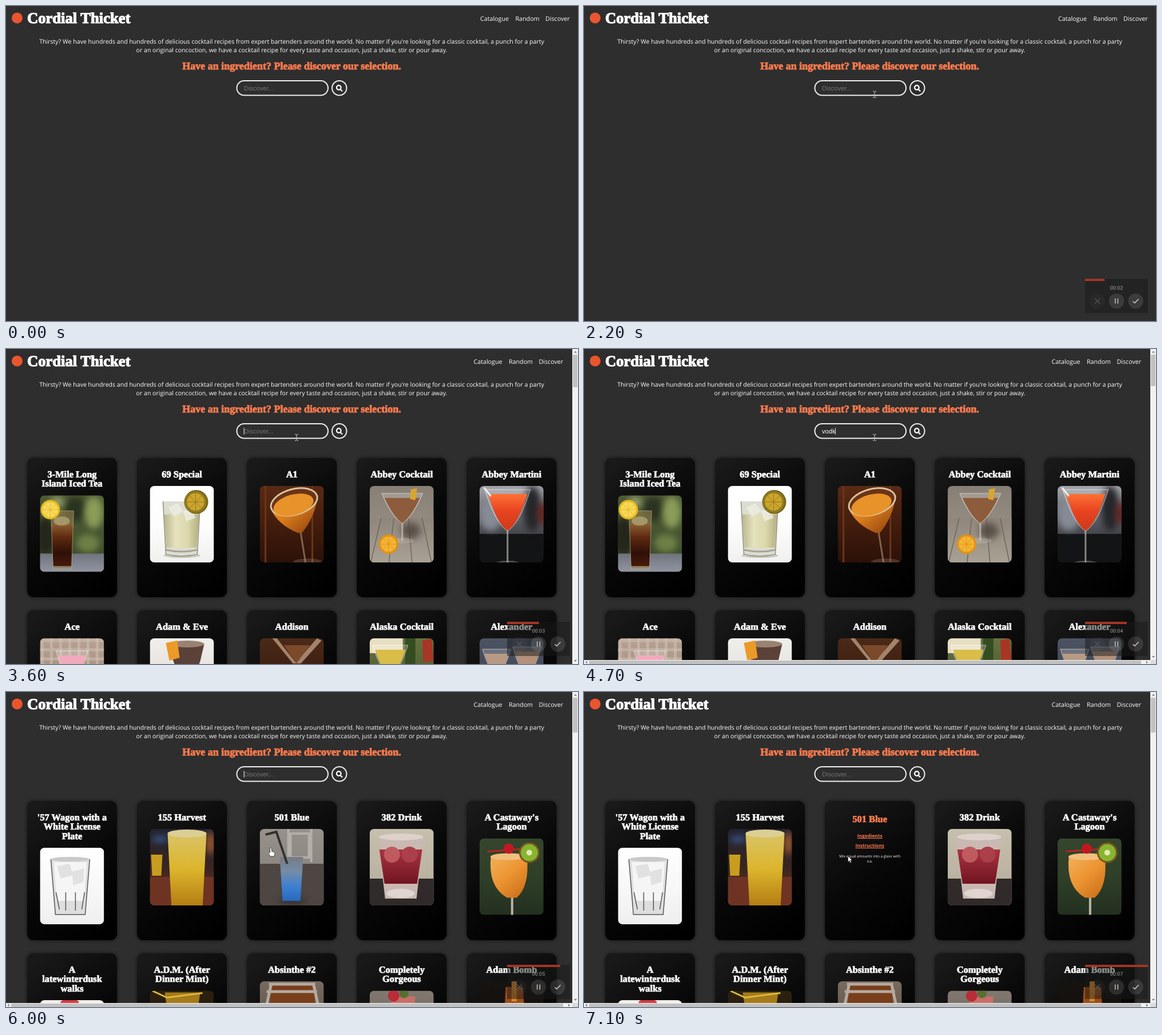
Recreate the animation shown at these times as an HTML page with a canvas. Size 1000x552 px, loop 7.2 s.

```html
<!DOCTYPE html>
<html lang="en">
<head>
<meta charset="utf-8">
<title>Cordial Thicket</title>
<style>
  html, body { margin: 0; height: 100%; overflow: hidden; background: #2e2e2e; }
  canvas { display: block; }
</style>
</head>
<body>
<canvas id="stage" width="1000" height="552"></canvas>
<script>
const ctx = document.getElementById('stage').getContext('2d');
const LOOP = 7200, STEP = 100;
const BG = '#2e2e2e', CORAL = '#ff7b4d', TAU = Math.PI * 2;
const SANS = '"Open Sans", sans-serif', ARIAL = '"Liberation Sans", sans-serif';
const CARDS_AT = 2600, RESULTS_AT = 5200, FLIP_AT = 6400, FLIP_MS = 500;
const KEYS = [4200, 4350, 4500, 4650, 4800];

// ---- drawing helpers ----
function fill(color, path) {
  ctx.fillStyle = color;
  ctx.fill(new Path2D(path));
}
function line(color, width, path) {
  ctx.strokeStyle = color;
  ctx.lineWidth = width;
  ctx.stroke(new Path2D(path));
}
function disc(color, x, y, rx, ry = rx, tilt = 0) {
  ctx.fillStyle = color;
  ctx.beginPath();
  ctx.ellipse(x, y, rx, ry, tilt, 0, TAU);
  ctx.fill();
}
function rect(color, x, y, w, h) {
  ctx.fillStyle = color;
  ctx.fillRect(x, y, w, h);
}
function rounded(x, y, w, h, r) {
  ctx.beginPath();
  ctx.roundRect(x, y, w, h, r);
}
function gradient(x0, y0, x1, y1, ...colors) {
  const g = ctx.createLinearGradient(x0, y0, x1, y1);
  colors.forEach((c, i) => g.addColorStop(i / (colors.length - 1), c));
  return g;
}
function write(text, x, y, font, color, align = 'center') {
  ctx.font = font;
  ctx.textAlign = align;
  ctx.fillStyle = color;
  ctx.fillText(text, x, y);
}
function display(text, x, y, size, color = '#fff', align) {
  write(text, x, y, `bold ${size}px "Liberation Serif", serif`, color, align);
  ctx.strokeStyle = color;
  ctx.lineWidth = size / 22;
  ctx.strokeText(text, x, y);
}

// ---- photographs, each 112 x 134 ----
const backdrop = (...colors) => rect(gradient(0, 0, 0, 134, ...colors), 0, 0, 112, 134);
const tumbler = (color, left, right, top, bottom, inset) =>
  fill(color, `M${left} ${top}H${right}L${right - inset} ${bottom}H${left + inset}Z`);
function haze(color, x, y, rx, ry) {
  ctx.filter = 'blur(6px)';
  disc(color, x, y, rx, ry);
  ctx.filter = 'none';
}
function martini(drink, x, rim, half, apex, foot) {
  const bowl = (w, top) =>
    `M${x - w} ${top}H${x + w}Q${x + w * .55} ${apex - 14} ${x} ${apex}Q${x - w * .55} ${apex - 14} ${x - w} ${top}Z`;
  line('#d5d0c999', 3, `M${x} ${apex - 4}V${foot}`);
  disc('#c9c4bd55', x, foot, half * .55, 5);
  fill('#ffffff33', bowl(half, rim));
  fill(drink, bowl(half * .86, rim + 8));
  line('#ffffff88', 1, bowl(half, rim));
}
function citrus(x, y, r, rind, flesh) {
  disc(rind, x, y, r);
  disc(flesh, x, y, r * .8);
  for (let a = 0; a < 4; a++) {
    const dx = r * .8 * Math.cos(a * TAU / 8), dy = r * .8 * Math.sin(a * TAU / 8);
    line(rind, 1, `M${x - dx} ${y - dy}L${x + dx} ${y + dy}`);
  }
}

function icedTea() {
  backdrop('#4c5a33', '#465431', '#3a4529');
  haze('#23261a', 10, 72, 18, 34);
  haze('#2a3320', 62, 24, 18, 22);
  haze('#8a9c58', 94, 30, 16, 28);
  haze('#6d8146', 84, 84, 20, 16);
  haze('#93a06e', 30, 12, 12, 10);
  rect(gradient(0, 102, 0, 134, '#6f737d', '#9095a1'), 0, 102, 112, 32);
  tumbler('#97804f99', 19, 59, 27, 129, 4);
  tumbler(gradient(0, 46, 0, 128, '#93693a', '#5e2a10', '#2f1008', '#4b1c0b'), 20, 58, 50, 124, 3);
  disc('#cdbb8f88', 38, 45, 14, 8);
  line('#d8cfb477', 1, 'M19 27L23 129H55L59 27Z');
  citrus(18, 25, 17, '#e9b81e', '#f6d95c');
}
function special() {
  backdrop('#fff', '#fdfdfc', '#f0f0ed');
  disc('#c4c4bc', 56, 122, 32, 4);
  tumbler('#dcdcd2', 23, 88, 27, 123, 5);
  tumbler(gradient(24, 0, 87, 0, '#b9b58b', '#e4e1bd', '#dcd8ac', '#b3ad7e'), 25, 86, 50, 108, 4);
  line('#8f8f80', 1.5, 'M23 27L28 120Q56 126 83 120L88 27');
  line('#a5a592', 3, 'M28 112Q56 118 83 112');
  fill('#f1f1e4bb', 'M32 38L48 30L58 44L42 54ZM58 44L74 38L80 56L64 62Z');
  disc('#75681c', 81, 28, 21);
  citrus(80, 28, 19, '#8f7b20', '#cda42c');
}
function a1() {
  backdrop('#5a2a14', '#431d0d', '#2b1108');
  line('#6b3519', 3, 'M10 0V134M92 0V134');
  line('#b8937a99', 3, 'M71 78L80 134');
  disc('#b8937a44', 84, 134, 26, 7);
  fill(gradient(20, 10, 80, 84, '#efa233', '#dd7f1c', '#9a4a12'), 'M19 40Q32 68 66 82L73 83Q96 56 102 16Z');
  disc('#d9c4a0', 60, 28, 43, 24, -.26);
  disc('#6b3416', 60, 28, 40, 21, -.26);
  disc('#e8922a', 59, 33, 36, 18, -.26);
}
function abbey() {
  backdrop('#877f75', '#958c81', '#8d8478');
  rect(gradient(0, 56, 0, 134, '#8f867b', '#aaa195'), 0, 57, 112, 77);
  line('#6f665c', 1.5, 'M20 57L2 134M42 57L34 134M68 57L74 134M92 57L108 134');
  haze('#4b443dcc', 72, 79, 17, 15);
  martini('#8a5330dd', 57, 13, 36, 66, 96);
  fill('#d9a52f', 'M72 6L83 4L80 25L71 23Z');
  citrus(33, 102, 17, '#e09214', '#f4b436');
}
function abbeyMartini() {
  backdrop('#a3a5aa', '#54555b', '#18181a');
  rect('#131416', 0, 84, 112, 50);
  haze('#858a94', 20, 50, 20, 28);
  haze('#26272b', 92, 40, 16, 40);
  haze('#672018', 110, 48, 8, 20);
  martini(gradient(0, 12, 0, 75, '#ff7436', '#e84420', '#d23a1a'), 49, 6, 40, 79, 136);
  line('#eee', 3, 'M8 3L20 18');
}
function ace() {
  backdrop('#b5a193', '#9a8073');
  for (let x = 4; x < 112; x += 16) line('#d2c4b488', 5, `M${x} 0V134M0 ${x}H112`);
  martini('#f3a9bc', 56, 22, 28, 80, 128);
}
function adam() {
  backdrop('#f1efec', '#d5d1cd');
  fill('#5b4137', 'M34 10H95L88 40Q78 70 62 68Q42 60 34 10Z');
  disc('#9a8271', 65, 10, 30, 6);
  fill('#eb9a28', 'M28 8L48 4L52 34L34 39Z');
}
function addison() {
  backdrop('#4c2918', '#28120b');
  fill('#a3836a', 'M22 0L58 44L64 44L30 0ZM100 0L62 44L72 44L108 4Z');
  fill('#7b4a2a', 'M42 12H88L64 44Z');
}
function alaska() {
  backdrop('#65713f', '#3f4a25');
  rect('#e8dfc2', 0, 0, 58, 26);
  rect('#344d20', 62, 0, 18, 50);
  fill('#a83624', 'M92 4L108 0L112 40L94 42Z');
  martini('#d9bd48', 36, 12, 31, 70, 120);
}
function alexander() {
  backdrop('#4c5362', '#383a42');
  martini('#b89a84', 30, 19, 25, 70, 120);
  martini('#b3917a', 83, 15, 25, 70, 120);
}
function clearGlass() {
  backdrop('#fff', '#f8f8f8', '#efefef');
  tumbler('#dedede', 19, 87, 20, 117, 8);
  tumbler('#f5f5f5', 24, 82, 25, 93, 5);
  line('#555', 1.5, 'M19 20L27 117H79L87 20M28 78L34 108M45 78V110M62 78V110M78 78L73 108');
  disc('#c9c9c9', 53, 20, 34, 4);
  fill('#d0d0d088', 'M30 32L52 28L58 48L36 54ZM56 42L77 36L76 60L58 66Z');
}
function harvest() {
  backdrop('#222331', '#39251f', '#70361f');
  rect('#6e3322', 0, 84, 112, 50);
  haze('#3a5c96', 18, 18, 14, 5);
  haze('#a35b2d', 106, 25, 7, 20);
  tumbler('#c79c1f', 2, 22, 45, 82, 2);
  tumbler(gradient(0, 5, 0, 134, '#d9c46a', '#dcb52c', '#b47e13'), 31, 99, 7, 140, 7);
  disc('#dccf94', 65, 8, 34, 7);
}
function blue() {
  backdrop('#96928b', '#807b75');
  line('#b4b0a8', 4, 'M50 0V58M90 0V58M54 8H86V50H54Z');
  rect('#4d4642', 0, 61, 112, 73);
  haze('#302c2b', 57, 126, 24, 5);
  tumbler(gradient(0, 48, 0, 126, '#777980', '#768ca6', '#3e80d0', '#2869bf'), 35, 76, 49, 126, 5);
  line('#34302f', 4, 'M10 10L29 5L48 61');
}
function red() {
  backdrop('#c7bfae', '#b4aa99');
  rect('#302b2a', 0, 87, 112, 47);
  tumbler('#c9b9b2', 15, 94, 14, 122, 12);
  tumbler(gradient(0, 34, 0, 96, '#ab3541', '#701421'), 17, 92, 36, 96, 9);
  disc('#ded1cb', 55, 14, 39, 6);
  disc('#c05a61', 39, 45, 14);
  disc('#ab3f4b', 70, 45, 14);
  disc('#e0d5cf', 54, 113, 25, 8);
}
function lagoon() {
  backdrop('#35462d', '#2f3f28', '#233020');
  line('#b9b5a8', 4, 'M57 100V140');
  fill(gradient(20, 30, 82, 100, '#f3b15c', '#ec9431', '#c96d1a'), 'M20 31H83Q88 84 65 104H48Q14 84 20 31Z');
  disc('#f1bf7d', 51, 32, 32, 6);
  line('#b52622', 3, 'M14 23L84 18');
  disc('#c21822', 51, 18, 9);
  disc('#77541f', 87, 25, 18);
  disc('#87b52f', 87, 25, 15);
  disc('#e3e8b4', 87, 25, 5);
}
function dusk() {
  backdrop('#f3efed', '#ddd');
  disc('#d73c45', 52, 4, 16, 6);
}
function mint() {
  backdrop('#2c210d', '#19130a');
  tumbler('#a57a19', 26, 88, 3, 60, 8);
  line('#d9b93b', 3, 'M4 0L30 12L92 4');
}
function jar() {
  backdrop('#776b60', '#4d3d31');
  fill('#793f1c', 'M18 5H96V60H18Z');
  line('#b6aaa0', 5, 'M16 5H97M12 18H100M20 5L12 42M94 5L102 42');
}
function gorgeous() {
  backdrop('#81796f', '#5d554d');
  tumbler('#c76f67', 37, 80, 10, 60, 5);
  disc('#b92c38', 42, 9, 10);
  disc('#586e31', 60, 5, 8);
}
function bomb() {
  backdrop('#171310', '#0c0a09');
  tumbler('#9b4d16', 46, 76, 10, 60, -3);
  rect('#d58a2a', 56, 0, 9, 35);
}

const MENU = [
  ['3-Mile Long|Island Iced Tea', icedTea], ['69 Special', special], ['A1', a1],
  ['Abbey Cocktail', abbey], ['Abbey Martini', abbeyMartini],
  ['Ace', ace], ['Adam & Eve', adam], ['Addison', addison],
  ['Alaska Cocktail', alaska], ['Alexander', alexander]
];
const RESULTS = [
  ["'57 Wagon with a|White License|Plate", clearGlass], ['155 Harvest', harvest], ['501 Blue', blue],
  ['382 Drink', red], ["A Castaway's|Lagoon", lagoon],
  ['A|latewinterdusk|walks', dusk], ['A.D.M. (After|Dinner Mint)', mint], ['Absinthe #2', jar],
  ['Completely|Gorgeous', gorgeous], ['Adam Bomb', bomb]
];

// ---- page parts ----
function drawHeader(navShift) {
  disc('#e9552f', 19.5, 21, 9.5);
  display('Cordial Thicket', 37, 30, 26.6, '#fff', 'left');
  [['Catalogue', 829], ['Random', 890.5], ['Discover', 943]].forEach(([label, x]) =>
    write(label, x - navShift, 25.5, `10.7px ${SANS}`, '#fff', 'left'));
  const body = `10.57px ${SANS}`;
  write("Thirsty? We have hundreds and hundreds of delicious cocktail recipes from expert bartenders around the world. No matter if you're looking for a classic cocktail, a punch for a party", 499.5, 66, body, '#fff');
  write('or an original concoction, we have a cocktail recipe for every taste and occasion, just a shake, stir or pour away.', 499.5, 81, body, '#fff');
  display('Have an ingredient? Please discover our selection.', 499.5, 111, 18, CORAL);
}

function drawSearch(t) {
  ctx.strokeStyle = '#eee';
  ctx.lineWidth = 2;
  rounded(403.5, 131, 159.5, 25.5, 12.75);
  ctx.stroke();
  rounded(570, 131, 25.5, 25.5, 12.75);
  ctx.stroke();
  line('#fff', 2.2, 'M584.5 146L588 149.5M578 143a3.8 3.8 0 1 0 7.6 0a3.8 3.8 0 1 0 -7.6 0');

  const typed = t < RESULTS_AT ? 'vodka'.slice(0, KEYS.filter(k => t >= k).length) : '';
  write(typed || 'Discover...', 416, 147.5, `11.1px ${ARIAL}`, typed ? '#fff' : '#767676', 'left');
  const caretX = 416 + (typed ? ctx.measureText(typed).width : 0);
  const lastReset = [200, ...KEYS].filter(k => t >= k).pop();
  const focused = t >= 500 && t < FLIP_AT;
  if (focused && (t - lastReset) % 1060 < 530) rect('#ddd', caretX - .5, 138, 1, 12);
}

function drawBack() {
  display('501 Blue', 78.5, 37, 16.4, CORAL);
  [['Ingedients', 64], ['Instructions', 81]].forEach(([label, y]) => {
    write(label, 78.5, y, `bold 8.3px ${SANS}`, CORAL);
    const w = ctx.measureText(label).width;
    rect(CORAL, 78.5 - w / 2, y + 1, w, 1);
  });
  write('Mix equal amounts into a glass with', 78.5, 99, `6.42px ${SANS}`, '#fff');
  write('ice.', 78.5, 108, `6.42px ${SANS}`, '#fff');
}

function drawCard([title, photo], i, turn) {
  const lines = title.split('|'), squash = Math.cos(turn);
  ctx.save();
  ctx.translate(37 + i % 5 * 192.1 + 78.5, 191 + Math.floor(i / 5) * 267);
  ctx.scale(Math.max(Math.abs(squash), .01), 1);
  ctx.translate(-78.5, 0);
  ctx.shadowColor = '#0009';
  ctx.shadowBlur = 7;
  ctx.fillStyle = gradient(0, 20, 157, 224, '#191919', '#080808', '#000');
  rounded(0, 0, 157, 244, 11);
  ctx.fill();
  ctx.shadowColor = 'transparent';
  if (squash < 0) {
    drawBack();
  } else {
    lines.forEach((text, n) => display(text, 78.5, 34 + n * 16.4, 16.4));
    ctx.translate(22.4, 49 + (lines.length - 1) * 16.5);
    rounded(0, 0, 112, 134, 8);
    ctx.clip();
    photo();
  }
  ctx.restore();
}

function drawScrollbars(t) {
  const wide = t >= KEYS[0], bottom = wide ? 545 : 552;
  const thumbEnd = t >= RESULTS_AT ? 71 : wide ? 65 : 67;
  rect('#f1f1f1', 990, 0, 10, 552);
  rect('#c1c1c1', 991, 10, 8, thumbEnd - 10);
  fill('#777', `M993 6.5H998L995.5 3.5ZM993 ${bottom - 7}H998L995.5 ${bottom - 4}Z`);
  if (!wide) return;
  rect('#f1f1f1', 0, 545, 990, 7);
  rect('#c1c1c1', 9, 546, 965, 6);
  rect('#dcdcdc', 990, 545, 10, 7);
  fill('#777', 'M5.5 546.5V551.5L2.5 549ZM983 546.5V551.5L986 549Z');
}

function drawRecorder(t) {
  rect('#18181880', 876, 478, 110, 60);
  rect('#a53522', 876, 478, Math.min(110, t * .0155), 4);
  const seconds = Math.floor(Math.max(0, t - 50) / 1000);
  write(`00:0${seconds}`, 931, 496.5, '9px Roboto, sans-serif', '#a0a0a0');
  disc('#ffffff08', 897.5, 517, 13.3);
  disc('#ffffff1c', 931, 517, 13.3);
  disc('#ffffff1c', 964.5, 517, 13.3);
  line('#555', 1.2, 'M893 512.5L902 521.5M902 512.5L893 521.5');
  line('#bbb', 1.6, 'M928.7 512.5V521.5M933.3 512.5V521.5');
  line('#ccc', 1.6, 'M959.5 517.5L962.8 520.5L969.5 513.5');
}

function ease(t, start, end) {
  const p = Math.min(1, Math.max(0, (t - start) / (end - start)));
  return p * p * (3 - 2 * p);
}

function drawPointer(t) {
  const enter = ease(t, 100, 500), leave = ease(t, 5300, 5900), settle = ease(t, 6000, 6500);
  const x = 560 - 52 * enter - 45 * leave - 1.5 * settle;
  const y = 300 - 145 * enter + 119 * leave + 13.5 * settle;
  ctx.save();
  ctx.translate(x, y);
  if (y < 158) {
    line('#ccc', 1, 'M-3 -5.5H-1L0 -4.5L1 -5.5H3M0 -5V5M-3 5.5H-1L0 4.5L1 5.5H3');
  } else {
    const hand = t >= RESULTS_AT && y > 191 && t < FLIP_AT + FLIP_MS / 2;
    const outline = hand
      ? 'M-1.5 0Q0 -2 1.5 0V5L6 6.5Q7.5 7 7 9L6 14H-1L-4.5 8.5Q-4 6.5 -1.5 8Z'
      : 'M0 0V10.5L2.5 8.2L4.2 12L6 11.2L4.3 7.5H7.5Z';
    fill('#fff', outline);
    line('#222', .8, outline);
  }
  ctx.restore();
}

function draw(t) {
  ctx.textRendering = 'geometricPrecision';
  const loaded = t >= CARDS_AT, results = t >= RESULTS_AT;
  rect(BG, 0, 0, 1000, 552);
  drawHeader(loaded ? 11.5 : 0);
  drawSearch(t);
  if (loaded) {
    const turn = Math.PI * ease(t, FLIP_AT, FLIP_AT + FLIP_MS);
    (results ? RESULTS : MENU).forEach((card, i) => drawCard(card, i, results && i === 2 ? turn : 0));
    drawScrollbars(t);
  }
  if (t >= STEP) {
    drawRecorder(t);
    drawPointer(t);
  }
}

const start = performance.now();
function tick() {
  const t = (performance.now() - start) % LOOP;
  draw(Math.floor(t / STEP) * STEP);
  requestAnimationFrame(tick);
}
tick();
</script>
</body>
</html>
```
